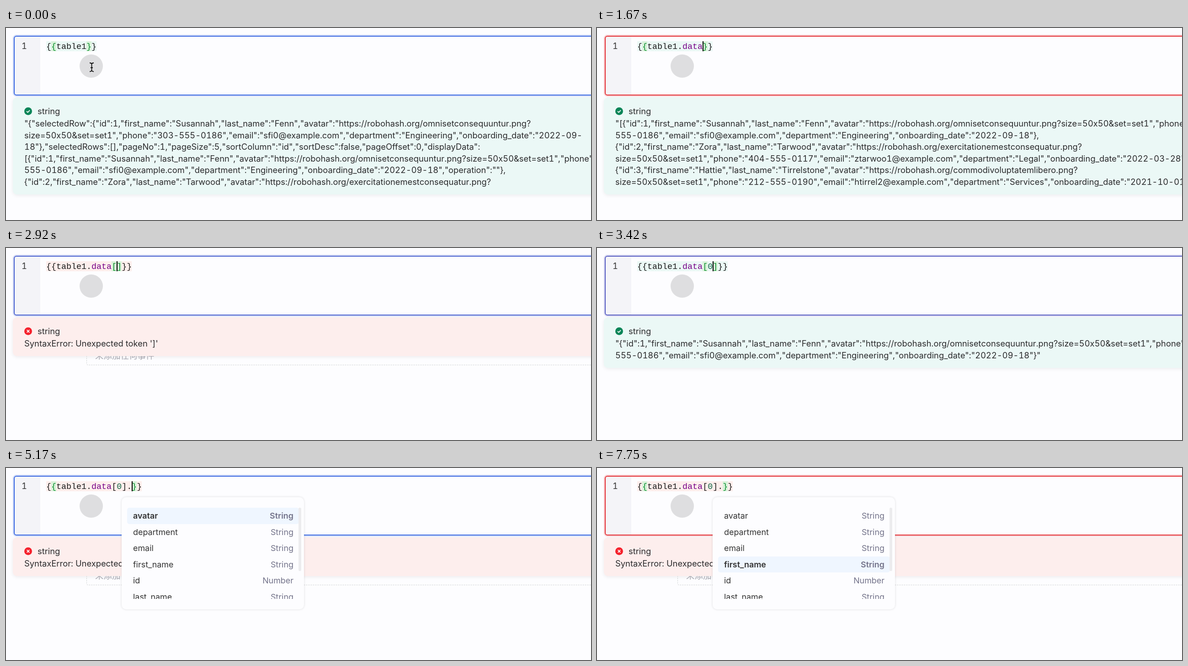
An HTML page for the animation above (8 s loop, 1280 px wide and 421 px high).

```html
<!DOCTYPE html>
<html lang="en">
<head>
<meta charset="utf-8">
<style>
html, body { margin: 0; width: 100%; height: 100%; overflow: hidden; background: #fdfdff; }
#stage { position: relative; width: 1280px; height: 421px; overflow: hidden;
  font: 18.35px/25.6px Inter, sans-serif; font-variant: no-contextual tabular-nums; color: #2b2b2d; }
#stage div, svg { position: absolute; white-space: pre; box-sizing: border-box; }
#events { left: 176px; top: 180px; width: 1300px; height: 77px; border: 1.5px dashed #d0d3d3; border-radius: 4px; }
#hint { left: 195px; top: 222px; font: 18.5px/26px "Noto Sans CJK SC", "Noto Sans CJK", sans-serif; color: #a9a9b2; }
#editor { left: 17px; top: 17px; width: 1300px; height: 131px; border: 2px solid; border-radius: 6px; background: #fdfdff; }
#gutter { left: 19px; top: 19px; width: 56px; height: 127px; background: #f4f4f8; border-radius: 5px 0 0 5px; }
#lineNo { left: 34px; top: 27px; color: #333; }
#code { left: 88px; top: 29px; height: 22px; font: 18.35px/25px "Liberation Mono", monospace; color: #1c1c1c; }
#code b { font-weight: 400; display: inline-block; height: 22px; vertical-align: top; color: #0b8f2f; background: #d9f2da; }
#code i { font-style: normal; color: #708; }
#code u { text-decoration: none; color: #164; }
#caret { top: 29px; width: 2px; height: 22px; background: #000; }
#result { left: 15px; top: 152px; width: 1300px; border-radius: 9px; box-shadow: 0 2px 8px rgba(0,0,0,.07); }
#type { left: 54px; top: 18px; }
#text { left: 25px; top: 45px; }
#icon { left: 25px; top: 21.5px; }
#popup { top: 64px; width: 399px; height: 246px; border-radius: 10px; background: #fdfdff; box-shadow: 0 0 5px rgba(0,0,0,.13); }
#list { left: 11.5px; top: 23px; width: 376px; height: 200px; overflow: hidden; font-size: 17.9px; }
#list div { left: 0; width: 376px; height: 35.6px; line-height: 36px; padding: 0 11.5px 0 13.5px; border-radius: 5px; color: #333; }
#list span { float: right; color: #73738a; }
#list .on { background: #eff6ff; font-weight: 600; }
#thumb { left: 387px; top: 23px; width: 6px; border-radius: 3px; background: #ececee; }
#spot { left: 161px; top: 58px; width: 51px; height: 51px; border-radius: 50%; background: rgba(0,0,0,.12); }
#beam { left: 180px; top: 74px; }
</style>
</head>
<body>
<div id="stage">
  <div id="events"></div><div id="hint">未添加任何事件</div>
  <div id="editor"></div><div id="gutter"></div><div id="lineNo">1</div>
  <div id="code"></div><div id="caret"></div>
  <div id="result">
    <svg id="icon" width="17" height="17" fill="none" stroke="#fff" stroke-width="1.8">
      <circle id="disc" cx="8.5" cy="8.5" r="8.5" stroke="none"/><path id="mark"/>
    </svg>
    <div id="type">string</div><div id="text"></div>
  </div>
  <div id="popup"><div id="list"></div><div id="thumb"></div></div>
  <div id="spot"></div>
  <svg id="beam" width="16" height="24" fill="none">
    <path d="M3 2.5Q7.5 2.5 7.5 6V18Q7.5 21.5 3 21.5M12 2.5Q7.5 2.5 7.5 6M7.5 18Q7.5 21.5 12 21.5M5 13H10" stroke="#111" stroke-width="1.8"/>
  </svg>
</div>
<script>
const $ = id => document.getElementById(id);
const TICKS = 96, PER_MS = 0.012;

const person = (id, first, last, image) =>
  `{"id":${id},"first_name":"${first}","last_name":"${last}","avatar":"https://robohash.org/${image}.png?`;
const contact = (phone, email, dept, date) =>
  `${phone}","email":"${email}@example.com","department":"${dept}","onboarding_date":"${date}`;
const SIZE = 'size=50x50&set=set1","phone":"';
const one = person(1, 'Susannah', 'Fenn', 'omnisetconsequuntur');
const oneRest = contact('555-0186', 'sfi0', 'Engineering', '2022-09-18"');
const two = person(2, 'Zora', 'Tarwood', 'exercitationemestconsequatur');
const three = person(3, 'Hattie', 'Tirrelstone', 'commodivoluptatemlibero');

const whole = [
  '"{"selectedRow":' + one,
  SIZE + contact('303-555-0186', 'sfi0', 'Engineering', '2022-09-'),
  '18"},"selectedRows":[],"pageNo":1,"pageSize":5,"sortColumn":"id","sortDesc":false,"pageOffset":0,"displayData":',
  '[' + one + SIZE + '303-',
  oneRest + ',"operation":""},',
  two
];
const rows = [
  '"[' + one + SIZE + '303-',
  oneRest + '},',
  two,
  SIZE + contact('404-555-0117', 'ztarwoo1', 'Legal', '2022-03-28"},'),
  three,
  SIZE + contact('212-555-0190', 'htirrel2', 'Services', '2021-10-01"},')
];
const firstRow = ['"' + one + SIZE + '303-', oneRest + '}"'];
const error = token => [`SyntaxError: Unexpected token '${token}'`];

const tableMenu = { x: 164, thumb: 112, items: ['data Array', 'selectedRow Object', 'displayData Array',
  'filter Object', 'pageNo Number', 'pageOffset Number'] };
const rowMenu = { x: 253, thumb: 139, items: ['avatar String', 'department String', 'email String',
  'first_name String', 'id Number', 'last_name String'] };

const data = 'table1.<i>data</i>';
const outer = body => `{<b>{</b>${body}<b>}</b>}`;
const indexed = `{{${data}<b>[</b><u>0</u><b>]</b>}}`;
const steps = [
  { at: 0, code: outer('table1'), col: 8, ok: true, lines: whole },
  { at: 5, code: outer('table1.'), col: 9, lines: error('}'), menu: tableMenu },
  { at: 19, code: outer(data), col: 13, ok: true, lines: rows },
  { at: 33, code: `{{${data}<b>[</b><b>]</b>}}`, col: 14, lines: error(']') },
  { at: 38, code: indexed, col: 15, ok: true, lines: firstRow },
  { at: 55, code: indexed, col: 16, ok: true, lines: firstRow },
  { at: 61, code: outer(data + '[<u>0</u>].'), col: 17, lines: error('}'), menu: rowMenu }
];
const blinks = [3, 13, 19, 27, 33, 46, 52, 68, 75, 80, 86, 93]; // on, off, on, ...
const moves = [84, 89, 91];
const redness = [[0, 0], [6, 0], [7, .02], [8, .3], [9, .8], [11, 1], [20, 1], [25, 0], [34, 0], [35, .1],
  [37, .7], [38, .75], [41, .18], [44, 0], [62, 0], [67, 1], [TICKS, 1]];

const passed = (times, tick) => times.filter(t => t <= tick).length;

function borderColor(tick) {
  const i = redness.findIndex(([t]) => t > tick);
  const [t0, a] = redness[i - 1], [t1, b] = redness[i];
  const k = a + (b - a) * (tick - t0) / (t1 - t0);
  const blue = [59, 105, 226], red = [228, 50, 56];
  return blue.map((v, n) => Math.round(v + (red[n] - v) * k)).join();
}

function drawMenu(menu, selected) {
  $('popup').style.display = menu ? '' : 'none';
  if (!menu) return;
  $('popup').style.left = menu.x + 'px';
  $('thumb').style.height = menu.thumb + 'px';
  $('list').innerHTML = menu.items.map((item, i) => {
    const [name, kind] = item.split(' ');
    return `<div class="${i === selected ? 'on' : ''}" style="top:${i * 35.6}px">${name}<span>${kind}</span></div>`;
  }).join('');
}

function draw(tick) {
  const step = steps[passed(steps.map(s => s.at), tick) - 1];
  const { ok, lines } = step;
  const color = borderColor(tick);
  $('editor').style.borderColor = `rgb(${color})`;
  $('editor').style.boxShadow = `0 0 0 2.5px rgba(${color},.2)`;
  $('code').innerHTML = step.code;
  $('code').style.background = ok ? '#ebf8f5' : '#fdeeec';
  $('caret').style.left = 87.5 + step.col * 11.01 + 'px';
  $('caret').style.display = passed(blinks, tick) % 2 ? '' : 'none';
  $('result').style.height = 59.5 + lines.length * 25.6 + 'px';
  $('result').style.background = ok ? '#ebf8f6' : '#fdeeed';
  $('disc').setAttribute('fill', ok ? '#0b8558' : '#f5222d');
  $('mark').setAttribute('d', ok ? 'M5 8.6L7.6 11L12 6.4' : 'M5.7 5.7L11.3 11.3M11.3 5.7L5.7 11.3');
  $('text').textContent = lines.join('\n');
  $('beam').style.display = tick < 5 ? '' : 'none';
  drawMenu(step.menu, passed(moves, tick));
}

let last = -1;
const start = performance.now();
function loop() {
  const tick = Math.floor((performance.now() - start) * PER_MS + 0.06) % TICKS;
  if (tick !== last) draw(last = tick);
  requestAnimationFrame(loop);
}
loop();
</script>
</body>
</html>
```
